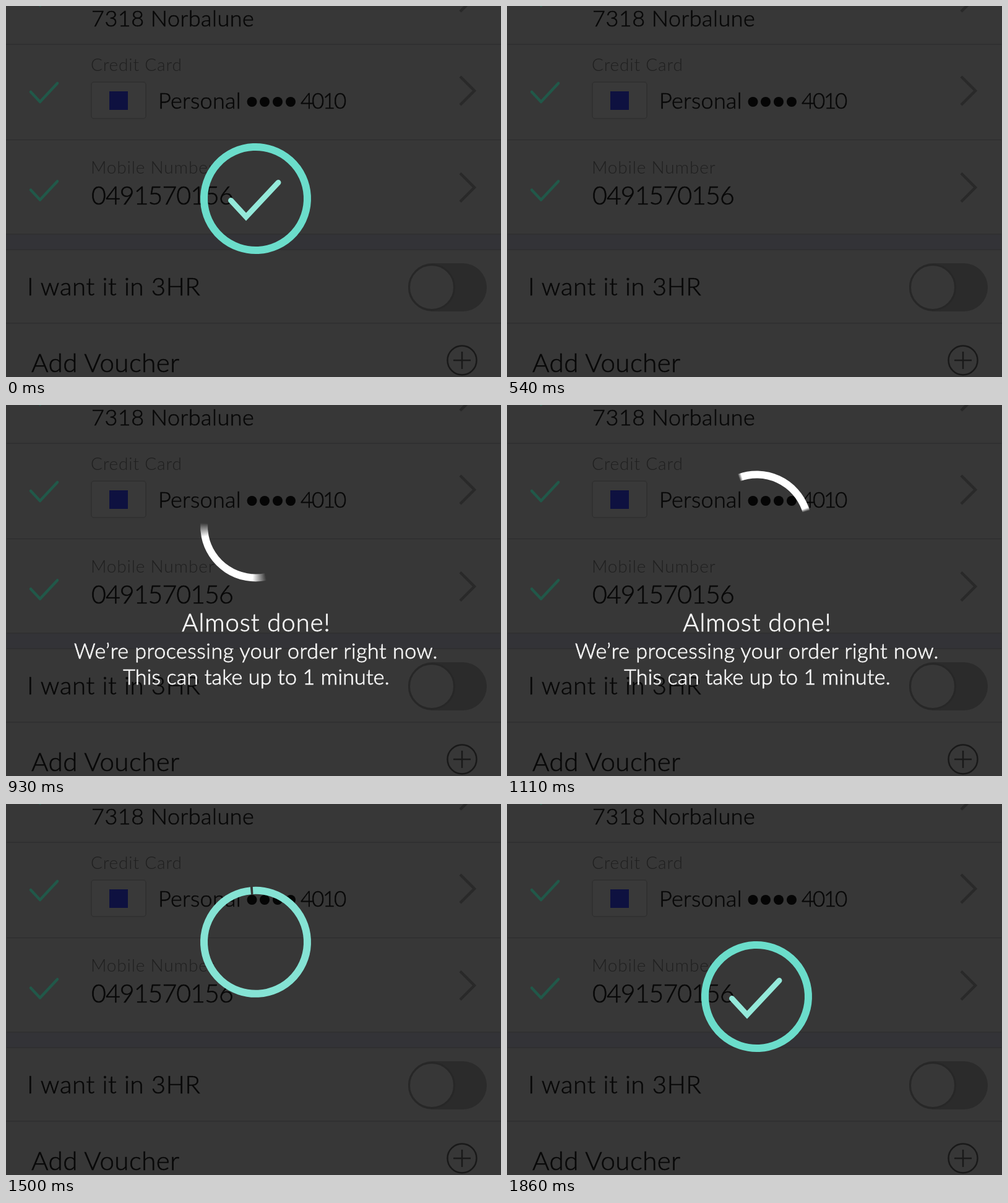
Write an HTML page with a canvas that moves like this. It is 800 by 600 pixels and loops after 1890 ms.

```html
<!DOCTYPE html>
<html lang="en">
<head>
<meta charset="utf-8">
<title>Order confirmation</title>
<style>
  html, body { margin: 0; width: 100%; height: 100%; overflow: hidden; background: #373737; }
  svg, canvas { position: absolute; left: 0; top: 0; width: 800px; height: 600px; }
  text { font-family: Lato, "Open Sans", sans-serif; font-weight: 300; fill: #080808; stroke: #080808; stroke-width: .6px; }
  .label { font-size: 28px; letter-spacing: .85px; fill: #1f1f1f; stroke: none; }
  .value { font-size: 36px; letter-spacing: .3px; }
  .line { stroke: #2b2b2c; stroke-width: 1.2; }
  .stroke { fill: none; stroke-width: 4.5; }
  #message text { fill: #f6f6f6; stroke: #f6f6f6; stroke-width: .8px; text-anchor: middle; }
</style>
</head>
<body>
<svg viewBox="0 0 800 600">
  <defs>
    <path id="tick" class="stroke" stroke="#215849" stroke-linecap="round" stroke-linejoin="round" d="M40 139L55 155L83 125"/>
    <path id="chevron" class="stroke" stroke="#292929" d="M734 114L757 137L734 160"/>
  </defs>
  <rect width="800" height="600" fill="#373737"/>
  <rect y="370" width="800" height="24" fill="#333337"/>
  <path class="line" d="M0 62H800M0 216.5H800M0 369H800M0 394H800M0 513H800"/>

  <use href="#tick" y="-156"/>
  <use href="#tick"/>
  <use href="#tick" y="158.5"/>
  <use href="#chevron" y="-151"/>
  <use href="#chevron"/>
  <use href="#chevron" y="156.5"/>

  <text class="value" x="138" y="33" style="letter-spacing:.5px">7318 Norbalune</text>
  <text class="label" x="137" y="105">Credit Card</text>
  <rect x="138" y="123" width="88" height="59" rx="4" fill="#393939" stroke="#2f2f2f" stroke-width="1.5"/>
  <rect x="167" y="138" width="30" height="30" fill="#0e1140"/>
  <text class="value" x="246" y="166">Personal</text>
  <g fill="#050505">
    <circle cx="397.5" cy="155" r="8"/>
    <circle cx="418" cy="155" r="8"/>
    <circle cx="439" cy="155" r="8"/>
    <circle cx="460" cy="155" r="8"/>
  </g>
  <text x="476" y="166" style="font-size:35px;letter-spacing:-2.3px">4010</text>
  <text class="label" x="137" y="271">Mobile Number</text>
  <text x="138" y="321" style="font-size:41px;letter-spacing:-.9px">0491570156</text>

  <text x="34" y="468" style="font-size:40px;letter-spacing:.7px">I want it in 3HR</text>
  <rect x="650" y="416" width="127" height="78" rx="39" fill="#2b2b2b"/>
  <circle cx="688" cy="455" r="36.5" fill="#373737" stroke="#272727" stroke-width="3"/>
  <text x="41" y="592" style="font-size:42px;letter-spacing:.5px">Add Voucher</text>
  <g fill="none" stroke="#191919" stroke-width="2.5">
    <circle cx="737" cy="573" r="23.5"/>
    <path d="M723 573H751M737 559V587"/>
  </g>
  <path id="edges" d="M0 60H1V397H0zM799 60H800V397H799z" fill="#373737"/>

  <g id="message">
    <text x="404.5" y="366" style="font-size:40px;letter-spacing:1px">Almost done!</text>
    <text x="404" y="410" style="font-size:34px;letter-spacing:.55px">We’re processing your order right now.</text>
    <text x="404.5" y="452" style="font-size:34px;letter-spacing:.2px">This can take up to 1 minute.</text>
  </g>
</svg>
<canvas id="stage" width="800" height="600"></canvas>
<script>
const LOOP = 1890, STEP = 30, RADIUS = 83.5, CENTER = 403.5;
const WHITE = [255, 255, 255], TEAL = [107, 221, 203];
const ctx = document.getElementById('stage').getContext('2d');
const message = document.getElementById('message');
const edges = document.getElementById('edges');

const ramp = (t, a, b) => Math.min(1, Math.max(0, (t - a) / (b - a)));
const smooth = u => u * u * (3 - 2 * u);
const mix = (a, b, u) => a + (b - a) * u;
const rad = deg => deg * Math.PI / 180;

// One fast turn, then a slow drift while the ring closes
const tail = t => -104 + 360 * smooth(ramp(t, 706, 1138)) + 11 * ramp(t, 1138, 1380);

// Cubic-bezier (.4, 0, .2, 1)
function settle(x) {
  let lo = 0, hi = 1;
  for (let i = 0; i < 24; i++) {
    const s = (lo + hi) / 2, r = 1 - s;
    if (1.2 * r * r * s + .6 * r * s * s + s * s * s < x) lo = s; else hi = s;
  }
  return lo * lo * (3 - 2 * lo);
}

// Arc whose ends are softened by its own rotation
function arc(y, start, sweep, blur, rgb) {
  const color = a => `rgba(${rgb.map(Math.round)},${a})`;
  const from = start - blur / 2, span = sweep + blur;
  let paint = color(1);
  if (blur > 1) {
    paint = ctx.createConicGradient(rad(from), CENTER, y);
    [[0, 0], [blur, 1], [sweep, 1], [span, 0]]
      .forEach(([deg, a]) => paint.addColorStop(deg / 360, color(a)));
  }
  ctx.strokeStyle = paint;
  ctx.lineWidth = 12;
  ctx.lineCap = 'butt';
  ctx.beginPath();
  ctx.arc(CENTER, y, RADIUS, rad(from), rad(from + span));
  ctx.stroke();
}

function check(y, alpha) {
  ctx.globalAlpha *= alpha;
  ctx.strokeStyle = '#94e9da';
  ctx.lineWidth = 9;
  ctx.lineCap = 'round';
  ctx.lineJoin = 'miter';
  ctx.beginPath();
  ctx.moveTo(CENTER - 40, y + 3);
  ctx.lineTo(CENTER - 15.5, y + 29.5);
  ctx.lineTo(CENTER + 36.5, y - 26);
  ctx.stroke();
}

function draw(t) {
  edges.style.display = t < STEP ? 'none' : '';
  message.style.opacity = ramp(t, 600, 750) * (1 - ramp(t, 1140, 1290));
  ctx.clearRect(0, 0, 800, 600);
  const ending = t < 600;
  const now = ending ? t + LOOP : t;
  ctx.globalAlpha = ending ? 1 - ramp(t, 300, 540) : ramp(t, 600, 750);
  const y = mix(196, 311.5, settle(ramp(now, 1380, 1860)));
  const sweep = 90 + 270 * smooth(ramp(now, 1170, 1520));
  const blur = tail(now + 6) - tail(now - 6);
  const tint = smooth(ramp(now, 1200, 1610));
  arc(y, tail(now), sweep, blur, WHITE.map((c, i) => mix(c, TEAL[i], tint)));
  check(y, ramp(now, 1500, 1640));
}

const begin = performance.now();
function tick() {
  const t = (performance.now() - begin) % LOOP;
  draw(Math.floor(t / STEP) * STEP);
  requestAnimationFrame(tick);
}
tick();
</script>
</body>
</html>
```
